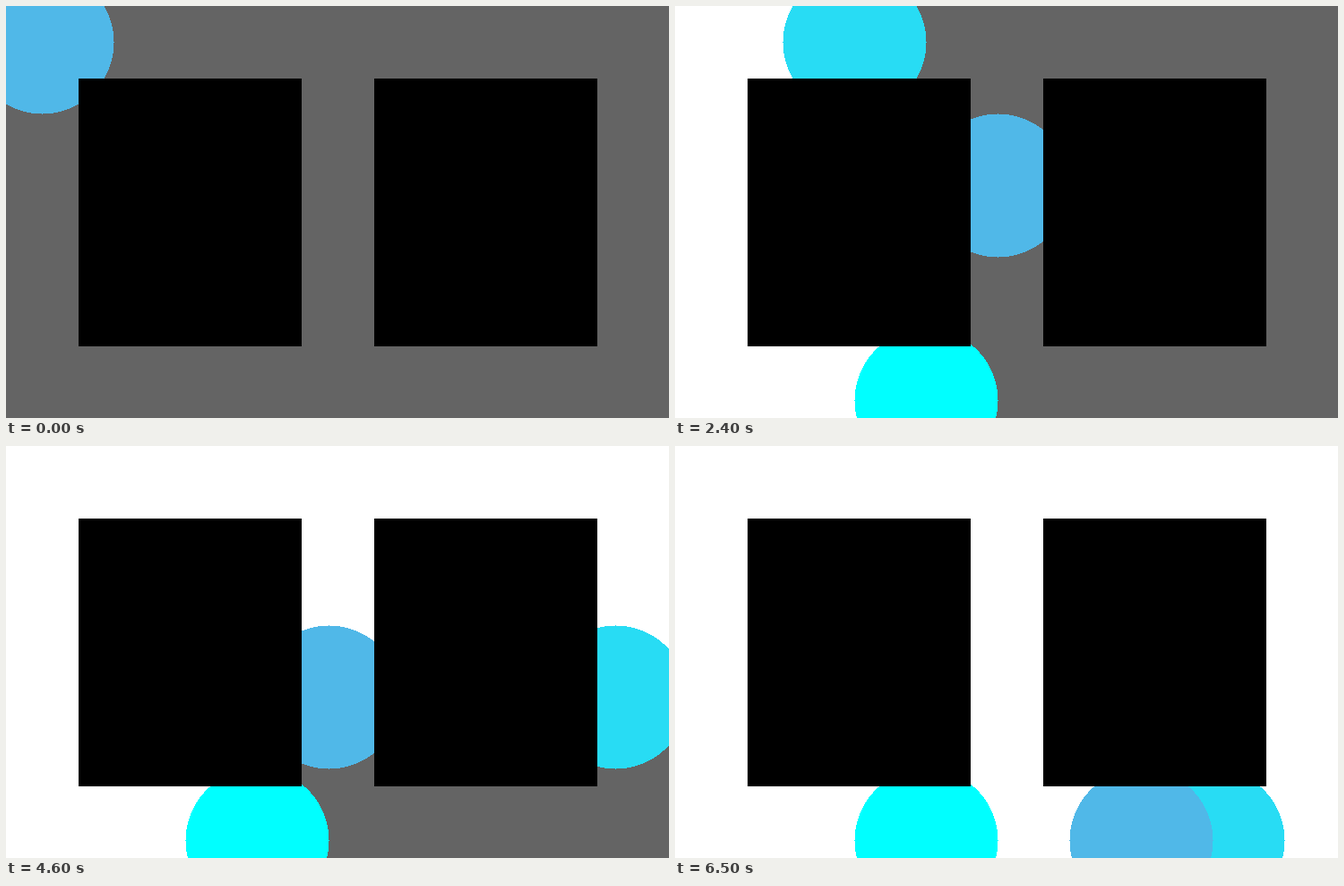
An HTML page with a canvas for the animation above (6.6 s loop, 740 px wide and 460 px high).

```html
<!DOCTYPE html>
<html lang="en">
<head>
<meta charset="utf-8">
<title>Corridor sweep</title>
<style>
  html, body { margin: 0; width: 100%; height: 100%; overflow: hidden; background: #646464; }
  canvas { display: block; }
</style>
</head>
<body>
<canvas id="stage" width="740" height="460"></canvas>
<script>
const ctx = document.getElementById('stage').getContext('2d');
const STEP = 100, CELL = 80, RADIUS = 80;
const COLS = 9, ROWS = 6;
const COLORS = { C: '#00ffff', S: '#28dcf4', B: '#50b8e8' }; // back to front
const DIRS = { u: [0, -1], d: [0, 1], l: [-1, 0], r: [1, 0] };

// One searcher takes one grid step per tick: searcher letter, then direction.
const MOVES = `
  Cd Sr Br Cd Sr Br Cd
  Br Cd Br Bd Bd Bu Bu
  Bd Cd Bd Cr Bd Cr Bd
  Cr Bu Bu Sr Bu Sr Bu
  Cr Sr Cl Sr Sr Cr Cl
  Sr Sl Sr Bd Cr Sd Cl
  Bd Sd Bd Sd Cr Cl Su
  Cr Cl Su Bd Cr Cl Bd
  Sd Br Cl Sd Br Cr Sd
  Sd Sl`.trim().split(/\s+/);

const isFree = (x, y) =>
  x >= 0 && y >= 0 && x < COLS && y < ROWS && (x % 4 === 0 || y % (ROWS - 1) === 0);
const key = (x, y) => y * COLS + x;

// Unsafe ground spreads through every cell that no searcher holds.
function spread(unsafe, bots) {
  const held = new Set(Object.values(bots).map(([x, y]) => key(x, y)));
  const next = new Set([...unsafe].filter(k => !held.has(k)));
  for (const k of next) {
    const x = k % COLS, y = Math.floor(k / COLS);
    for (const [dx, dy] of Object.values(DIRS)) {
      const n = key(x + dx, y + dy);
      if (isFree(x + dx, y + dy) && !held.has(n)) next.add(n);
    }
  }
  return next;
}

function buildStates() {
  const cells = [];
  for (let y = 0; y < ROWS; y++)
    for (let x = 0; x < COLS; x++)
      if (isFree(x, y)) cells.push(key(x, y));

  let bots = { C: [0, 0], S: [0, 0], B: [0, 0] };
  let unsafe = spread(new Set(cells), bots);
  const states = [];
  const save = () => states.push({ bots, safe: cells.filter(k => !unsafe.has(k)) });
  save();
  for (const [id, dir] of MOVES) {
    const [x, y] = bots[id], [dx, dy] = DIRS[dir];
    bots = { ...bots, [id]: [x + dx, y + dy] };
    unsafe = spread(unsafe, bots);
    save();
  }
  return states;
}

// Disc with hard pixel edges, drawn row by row.
function disc(col, row, color) {
  const cx = col * CELL + CELL / 2, cy = row * CELL + CELL / 2;
  ctx.fillStyle = color;
  for (let dy = -RADIUS; dy <= RADIUS; dy++) {
    const half = Math.floor(Math.sqrt(RADIUS * RADIUS - dy * dy));
    ctx.fillRect(cx - half, cy + dy, 2 * half + 1, 1);
  }
}

function draw({ bots, safe }) {
  ctx.fillStyle = '#646464';
  ctx.fillRect(0, 0, 740, 460);
  for (const k of safe) disc(k % COLS, Math.floor(k / COLS), '#fff');
  for (const id in COLORS) disc(...bots[id], COLORS[id]);
  ctx.fillStyle = '#000';
  for (const x of [81, 411]) ctx.fillRect(x, 81, 249, 299);
}

const states = buildStates();
const start = performance.now();
function tick() {
  const t = Math.max(0, performance.now() - start);
  draw(states[Math.floor(t / STEP) % states.length]);
  requestAnimationFrame(tick);
}
tick();
</script>
</body>
</html>
```
